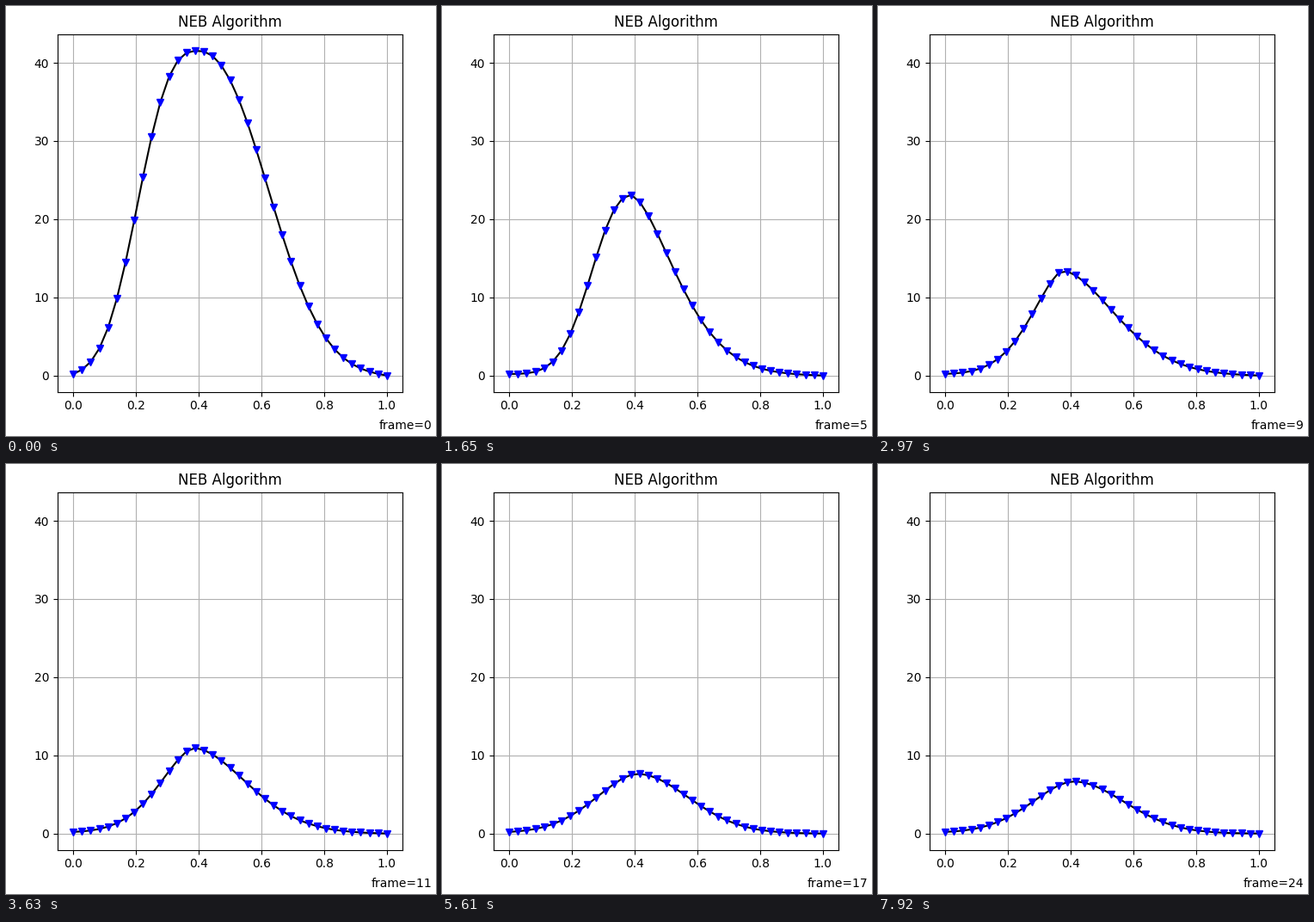
Animation of 500 by 500 pixels, one loop 8000 ms. Source, as a matplotlib script:

```python
import numpy as np
import matplotlib.pyplot as plt
from matplotlib.animation import FuncAnimation

STEP, TICK, LOOP = 330, 40, 8000  # ms per iteration, per redraw, per loop
START, FLOOR = 0.2, 6.4           # energy of the first image, final barrier

# How the bell changes over the iterations: centre, half-widths, steepness
KEYS = [0, 3, 5, 9, 13, 17]
CENTRE = [.397, .393, .389, .375, .395, .409]
LEFT_WIDTH = [.198, .154, .139, .114, .139, .156]
LEFT_POWER = [2.75, 2.35, 2.25, 1.65, 1.73, 1.8]
RIGHT_WIDTH = [.248, .174, .160, .193, .199, .191]
RIGHT_POWER = [2.27, 1.77, 1.62, 1.74, 1.9, 1.95]

path = np.linspace(0, 1, 37)


def barrier(k):
    """Falls at a steady rate, then decays towards the floor."""
    return 23.1 + 3.69 * (5 - k) if k < 5 else FLOOR + 16.7 * 0.805 ** (k - 5)


def energy(k):
    def at(values):
        return np.interp(k, KEYS, values)

    d = path - at(CENTRE)
    width = np.where(d < 0, at(LEFT_WIDTH), at(RIGHT_WIDTH))
    power = np.where(d < 0, at(LEFT_POWER), at(RIGHT_POWER))
    bell = barrier(k) * 0.5 ** (np.abs(d / width) ** power)
    # Pin both ends of the chain
    return bell + (START - bell[0]) * (1 - path) ** 8 - bell[-1] * path ** 8


fig = plt.figure(figsize=(5, 5), dpi=100)
ax = fig.add_axes([0.12, 0.1029, 0.802, 0.832])
ax.set_title("NEB Algorithm")
ax.set_xlim(-0.05, 1.05)
ax.set_ylim(-2.08, 43.69)
ax.grid(True)
line, = ax.plot(path, energy(0), "k-")
marks, = ax.plot(path, energy(0), "bv", markersize=6)
label = fig.text(0.99, 0.01, "frame=0", ha="right", va="bottom")


def draw(n):
    k = (n * TICK + TICK - 1) // STEP
    curve = energy(k)
    line.set_ydata(curve)
    marks.set_ydata(curve)
    label.set_text(f"frame={k}")
    return line, marks, label


anim = FuncAnimation(fig, draw, frames=LOOP // TICK, interval=TICK, repeat=True, repeat_delay=0)
plt.show()
```
